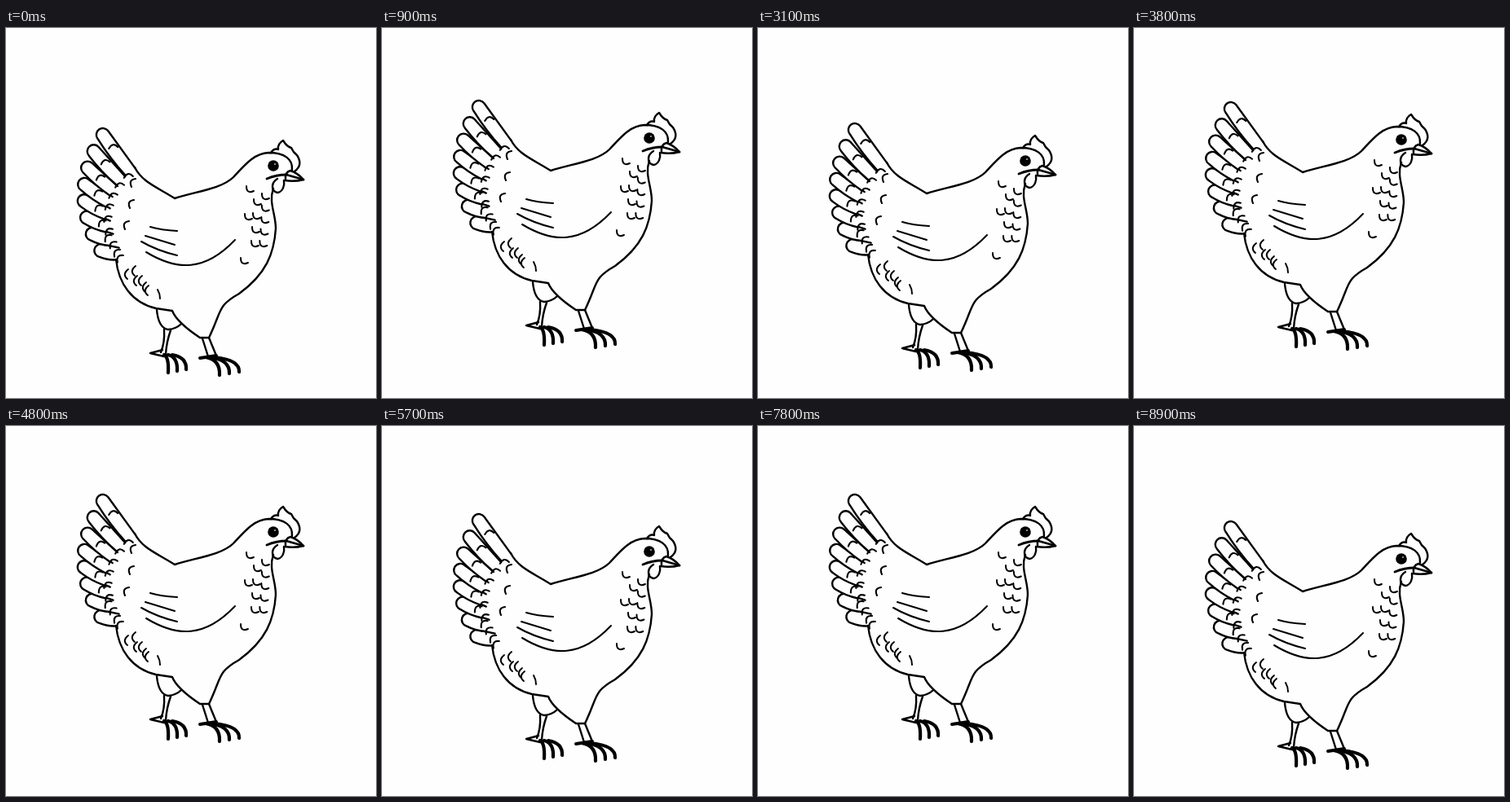
These frames come from a looping animation (454x454 px, 9 s). An HTML page with a canvas:

```html
<!DOCTYPE html>
<html lang="en">
<head>
<meta charset="utf-8">
<title>Bobbing hen</title>
<style>
html, body { margin: 0; width: 100%; height: 100%; overflow: hidden; background: #fefefe; }
canvas { display: block; }
</style>
</head>
<body>
<canvas id="stage" width="454" height="454"></canvas>
<script>
const ctx = document.getElementById('stage').getContext('2d');
const PAPER = '#fefefe', INK = '#000';
const SIZE = 454, HALF = 1500, LOOP = 9000, STEP = 100, DROP = 40;
const FEATHERS = 8, FEATHER_R = 8;

function stroke(path, width = 2.4) {
  ctx.lineWidth = width;
  ctx.stroke(path);
}

function line(d, width) {
  stroke(new Path2D(d), width);
}

function dot(x, y, r, color) {
  ctx.fillStyle = color;
  ctx.beginPath();
  ctx.arc(x, y, r, 0, Math.PI * 2);
  ctx.fill();
}

function at(x, y, angle, draw) {
  ctx.save();
  ctx.translate(x, y);
  ctx.rotate(angle);
  draw();
  ctx.restore();
}

// Small marks in the plumage.
const hook = (x, y) => at(x, y, 0, () => line('M-4 -5Q-4 5 5 1', 2));
const dash = (x, y) => at(x, y, 0, () => line('M3 -6Q-5 0 2 6', 1.9));
const bracket = () => line('M4 -5Q-5 -4 -1 5', 2.1);

// A rounded finger pointing along -x, open at its root.
function feather(length) {
  const path = new Path2D();
  path.moveTo(length, -FEATHER_R);
  path.lineTo(0, -FEATHER_R);
  path.arc(0, 0, FEATHER_R, -Math.PI / 2, Math.PI / 2, true);
  path.quadraticCurveTo(length / 2, FEATHER_R + 2, length, FEATHER_R - 1);
  ctx.fillStyle = PAPER;
  ctx.fill(path);
  stroke(path);
  at(19, -1, 0, bracket);
  at(length + 3, 5, 0, bracket);
}

// The fan overlaps from bottom to top, with longer feathers higher up.
function drawTail() {
  for (let i = FEATHERS - 1; i >= 0; i--) {
    const x = 95.5 + 1.8 * (i - 3.6) ** 2, y = 131 + 20.3 * i;
    at(x, y, (54 - 6 * i) * Math.PI / 180, () => feather(56 * 0.87 ** i));
  }
  for (let i = 0; i < 3; i++) at(155 - 2 * i * i, 190 + 26 * i, 0, bracket);
}

function drawBody() {
  line('M158 171C167 189 185 195 207 209C230 201 264 198 279 183C293 168 304 154 322 153C342 153 352 161 351 174');
  line('M328 197C322 214 331 228 331 246C329 277 319 302 286 326C259 341 265 347 249 380');
  line('M135 284C138 313 154 337 184 344L204 347C209 360 226 372 238 380H249');
}

function drawPlumage() {
  line('M177 244Q190 248 210 249', 2.1);
  line('M171 255L207 266', 2.1);
  line('M166 262Q185 273 210 279', 2.1);
  line('M172 275C210 298 244 299 281 260', 2.1);

  hook(299, 199);
  hook(297, 233);
  hook(292, 287);
  for (let i = 0; i < 5; i++) hook(318 - i * i / 6, 208 + 14.5 * i);
  for (let i = 0; i < 4; i++) hook(308 - i, 215 + 17 * i);
  for (let i = 0; i < 3; i++) {
    dash(147 + 11 * i, 302 + 8 * i);
    dash(156 + 8 * i, 298 + 12 * i);
  }
  line('M186 321Q189 326 189 332', 2);
}

function drawHead() {
  line('M325 153Q329 147 334 149Q333 142 340 138Q345 146 350 147Q352 152 357 156Q365 168 354 176');
  line('M320 185Q332 180 344 180L365 186', 2.8);
  line('M343 186Q342 177 349 175Q358 178 365 186Q354 189 342 187');
  line('M333 185C325 190 325 200 333 202C340 201 342 193 341 187');
  dot(328, 169, 6.8, INK);
  dot(330, 167, 1.1, '#aaa');
}

// Three curved claws fanning to the right.
function claws(x, y, endX, gap) {
  for (let i = 0; i < 3; i++) {
    const tipX = endX + gap * i;
    line(`M${x + 5 * i} ${y}Q${tipX + 1} ${y + 3} ${tipX} ${y + 22 - 2 * i}`, 4.2);
  }
}

function drawLegs() {
  line('M185 346Q187 368 199 370Q209 369 215 363');
  line('M194 370Q195 386 190 398M202 371Q197 385 196 400');
  line('M192 395L177 399L194 403');
  claws(194, 401, 199, 11);
  line('M241 381L248 403M249 380L258 402');
  line('M238 405L258 402', 4);
  claws(245, 404, 262, 12);
}

function drawHen() {
  drawTail();
  drawBody();
  drawPlumage();
  drawHead();
  drawLegs();
}

// Parabolic bounce: lowest at 0, highest at HALF, in whole pixels.
function offsetAt(ms) {
  const t = Math.floor(ms / STEP) * STEP % (2 * HALF);
  const u = Math.abs(t - HALF) / HALF;
  return Math.floor(DROP * u * u + 1e-6);
}

function frame() {
  ctx.setTransform(1, 0, 0, 1, 0, 0);
  ctx.fillStyle = PAPER;
  ctx.fillRect(0, 0, SIZE, SIZE);
  ctx.translate(0, offsetAt(performance.now() % LOOP) - DROP);
  ctx.strokeStyle = INK;
  ctx.lineCap = ctx.lineJoin = 'round';
  drawHen();
  requestAnimationFrame(frame);
}
frame();
</script>
</body>
</html>
```
